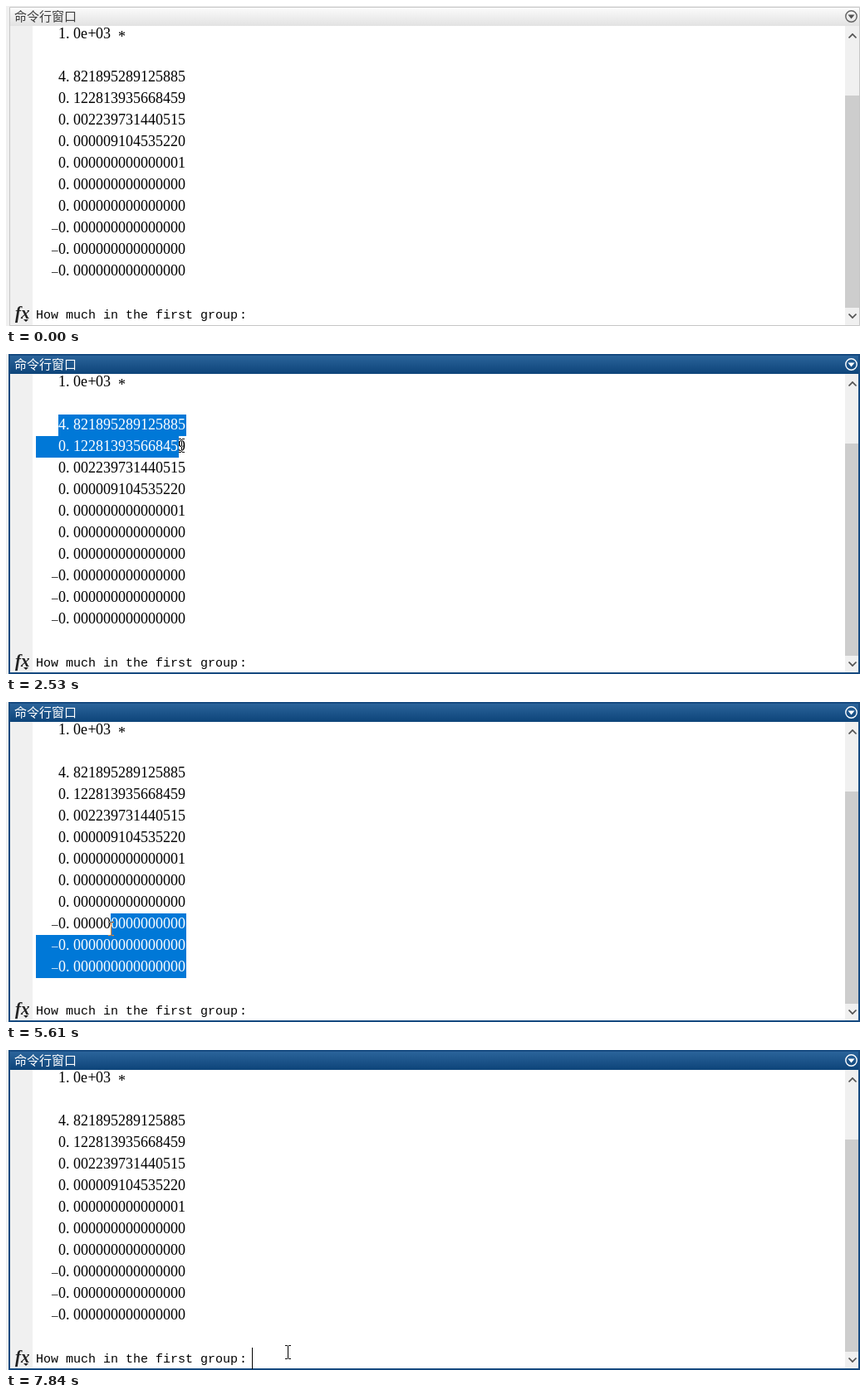
Write an HTML page that moves like this. It is 1028 by 386 pixels and loops after 8000 ms.

```html
<!DOCTYPE html>
<html lang="zh">
<head>
<meta charset="utf-8">
<style>
html, body { margin: 0; width: 100%; height: 100%; overflow: hidden; background: #f0f0f0; }
svg { display: block; width: 1028px; height: 386px; }
text { font-kerning: none; white-space: pre; }
.num { font: 18px "Liberation Serif", serif; }
.dash { font-size: 15px; }
.prompt { font: 15px "Liberation Mono", monospace; }
.title { font: 15px "Noto Sans CJK SC", "Noto Sans CJK", sans-serif; }
.fx { font: italic bold 21px "Liberation Serif", serif; fill: #222; }
#cursor { mix-blend-mode: difference; }
</style>
</head>
<body>
<svg viewBox="0 0 1028 386">
  <defs>
    <linearGradient id="idle" x2="0" y2="1"><stop stop-color="#fcfcfc"/><stop offset="1" stop-color="#e2e2e2"/></linearGradient>
    <linearGradient id="focus" x2="0" y2="1"><stop stop-color="#2c659c"/><stop offset="1" stop-color="#0d4479"/></linearGradient>
    <clipPath id="clip"><path id="clipShape"/></clipPath>
  </defs>
  <rect width="1028" height="386" fill="#f0f0f0"/>
  <rect x="32" y="24" width="978" height="361" fill="#fff"/>
  <rect x="1010" y="108" width="17" height="256" fill="#cdcdcd"/>
  <path d="M1014.5 38.5l4.5-4.5 4.5 4.5M1014.5 371.5l4.5 4.5 4.5-4.5" fill="none" stroke="#505050" stroke-width="1.7"/>
  <rect id="bar" x="4" y="1" width="1024" height="23"/>
  <path id="frame" fill="none"/>
  <text id="title" class="title" x="10" y="18">命令行窗口</text>
  <g id="button">
    <circle cx="1017.5" cy="12.5" r="6.7" fill="none" stroke-width="1.4"/>
    <path d="M1013.5 10.5h8l-4 5z" stroke="none"/>
  </g>
  <text class="fx" x="11" y="377">fx</text>
  <path d="M21 378h6l-3 3z" fill="#222"/>
  <text class="prompt" x="36" y="377">How much in the first group<tspan x="281">:</tspan></text>
  <text class="num" y="39"><tspan x="63">1.</tspan><tspan x="81">0</tspan><tspan x="90">e</tspan><tspan x="98.5">+</tspan><tspan x="108">03</tspan><tspan x="135" dy="4">*</tspan></text>
  <g id="rows" class="num"></g>
  <path id="selection" fill="#0078d7"/>
  <g id="selected" class="num" fill="#fff" clip-path="url(#clip)"></g>
  <rect id="rowCaret" width="1" height="26"/>
  <rect id="caret" x="296" y="359" width="1" height="26"/>
  <path id="cursor" d="M-3.5 -8h3M.5 -8h3M0 -7.5v15M-3.5 8h3M.5 8h3" fill="none" stroke="#fff"/>
</svg>
<script>
const LOOP = 8000, LEFT = 36, TOP = 73, CELL = 9, LINE = 26, COLS = 20;
const $ = id => document.getElementById(id);
const set = (el, attrs) => { for (const k in attrs) el.setAttribute(k, attrs[k]); };
const show = (el, on) => set(el, { visibility: on ? 'visible' : 'hidden' });

const zeros = '0.000000000000000';
const values = ['4.821895289125885', '0.122813935668459', '0.002239731440515',
  '0.000009104535220', '0.000000000000001', zeros, zeros,
  '–' + zeros, '–' + zeros, '–' + zeros];

const lines = values.map((v, i) => {
  const minus = v[0] === '–', n = minus ? v.slice(1) : v;
  return `<text y="${TOP + 18 + i * LINE}">` + (minus ? '<tspan class="dash" x="55">–</tspan>' : '') +
    `<tspan x="63">${n.slice(0, 2)}</tspan><tspan x="81">${n.slice(2)}</tspan></text>`;
}).join('');
$('rows').innerHTML = $('selected').innerHTML = lines;

// Pointer moves: first step, last step, step count, destination, easing
const linear = p => p, out = p => 1 - (1 - p) ** 2, smooth = p => p * p * (3 - 2 * p);
const moves = [
  [550, 1330, 11, 91, 106, out],
  [1390, 1700, 5, 67, 84, out],
  [2090, 2530, 7, 211, 110, smooth],
  [2610, 2690, 2, 220, 111, linear],
  [3180, 3930, 10, 68, 138, smooth],
  [4270, 4350, 2, 67, 138, out],
  [4650, 5230, 9, 221, 321, smooth],
  [5390, 5610, 4, 126, 273, linear],
  [5690, 6170, 8, 60, 155, out],
  [6230, 6610, 6, 32, 139, out],
  [6790, 7320, 8, 406, 325, smooth],
  [7400, 7560, 3, 342, 364, out],
  [7640, 7640, 1, 340, 364, linear],
  [7780, 7840, 2, 339, 364, linear]
];

function pointer(t) {
  let x = 930, y = 400;
  for (const [a, b, n, tx, ty, ease] of moves) {
    if (t < a) break;
    const step = b > a ? Math.min(n - 1, Math.floor((t - a) / (b - a) * (n - 1) + 0.001)) : n - 1;
    const p = ease((step + 1) / n);
    x += (tx - x) * p;
    y += (ty - y) * p;
  }
  return { x: Math.round(x), y: Math.round(y) };
}

const clamp = (v, max) => Math.max(0, Math.min(max, v));
function cellAt({ x, y }) {
  return { row: clamp(Math.floor((y - TOP) / LINE), 9), col: clamp(Math.floor((x - LEFT) / CELL), COLS) };
}

// Mouse press, release, and when the selection is dropped
const drags = [
  { press: 1930, release: 2690, end: 5390, anchor: { row: 0, col: 3 } },
  { press: 5390, release: 6610, end: 7780, anchor: { row: 9, col: COLS } }
];

function selectionPath(a, b) {
  const key = c => c.row * 100 + c.col;
  if (key(a) === key(b)) return '';
  if (key(a) > key(b)) [a, b] = [b, a];
  let d = '';
  for (let r = a.row; r <= b.row; r++) {
    const from = LEFT + CELL * (r === a.row ? a.col : 0);
    const to = LEFT + CELL * (r === b.row ? b.col : COLS) + 1;
    d += `M${from} ${TOP + r * LINE}H${to}v${LINE}H${from}z`;
  }
  return d;
}

const blinks = [1930, 2430, 2920, 3430, 3930, 4510, 5010, 5510, 6030, 6550, 7050, 7560, 7780];

function draw(t) {
  const active = t >= 1930;
  set($('bar'), { fill: active ? 'url(#focus)' : 'url(#idle)' });
  set($('frame'), {
    d: active ? 'M4 1H1027V385H4z' : 'M4.5 1.5H1027.5V385.5H4.5z',
    stroke: active ? '#164a80' : '#c6c6c6',
    'stroke-width': active ? 2 : 1
  });
  set($('title'), { fill: active ? '#fff' : '#3c3c3c' });
  set($('button'), { fill: active ? '#fff' : '#505050', stroke: active ? '#fff' : '#606060' });

  const pos = pointer(t);
  set($('cursor'), { transform: `translate(${pos.x + 0.5} ${pos.y + 0.5})` });
  show($('cursor'), t >= 550);

  const lit = blinks.filter(b => b <= t).length % 2 === 1;
  show($('caret'), lit);

  const drag = drags.find(g => t >= g.press && t < g.end);
  let d = '';
  if (drag) {
    const head = cellAt(pointer(Math.min(t, drag.release)));
    d = selectionPath(drag.anchor, head);
    set($('rowCaret'), { x: LEFT + CELL * head.col + 1, y: TOP + LINE * head.row });
  }
  show($('rowCaret'), drag && lit);
  set($('selection'), { d });
  set($('clipShape'), { d });
}

const start = performance.now();
function tick() {
  draw((performance.now() - start) % LOOP);
  requestAnimationFrame(tick);
}
tick();
</script>
</body>
</html>
```
